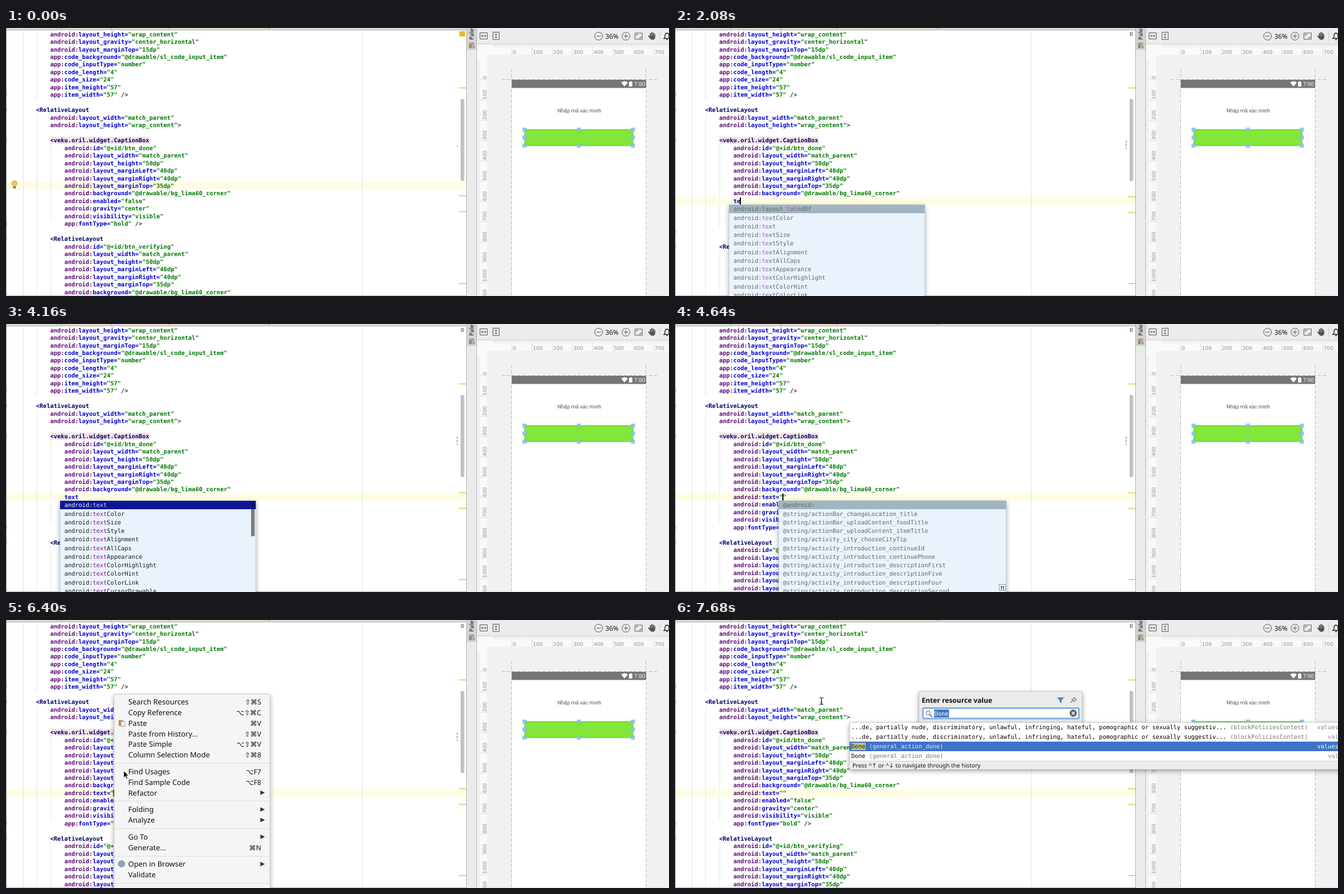
Write an HTML page that moves like this. It is 1177 px wide and 476 px high and loops after 8000 ms.

```html
<!DOCTYPE html>
<html lang="en">
<head>
<meta charset="utf-8">
<title>Layout editor</title>
<style>
html, body { margin: 0; width: 100%; height: 100%; overflow: hidden; background: #fff; }
svg { display: block; }
text { white-space: pre; text-rendering: geometricPrecision; }
.mono { font: 10.45px "DejaVu Sans Mono", monospace; }
.ui { font: 13px "Noto Sans", "DejaVu Sans", sans-serif; fill: #111; }
.key { font-size: 12.2px; }
.b { font-weight: bold; }
.ns { fill: #5c0a70; font-weight: bold; }
.at { fill: #0000d0; font-weight: bold; }
.val { fill: #007c00; font-weight: bold; }
.tag { fill: #000062; font-weight: bold; }
.num { font: 9px "DejaVu Sans", sans-serif; fill: #8d8d8d; }
.row.on text { fill: #fff; }
.float { filter: drop-shadow(0 3px 4px rgba(0, 0, 0, .35)); }
</style>
</head>
<body>
<svg id="stage" width="1177" height="476" viewBox="0 0 1177 476"></svg>
<script>
const LOOP = 8000, TICK = 160, LINE = 13.47, CH = 6.291;
const colX = c => 53.3 + (c - 8) * CH;
const baseY = row => 14.6 + row * LINE;

const esc = s => s.replace(/&/g, '&amp;').replace(/</g, '&lt;');
const rect = (x, y, w, h, fill, more = '') =>
  `<rect x="${x}" y="${y}" width="${w}" height="${h}" fill="${fill}" ${more}/>`;
const path = (d, stroke, more = '') => `<path d="${d}" stroke="${stroke}" fill="none" ${more}/>`;
const text = (x, y, cls, body, more = '') =>
  `<text x="${x}" y="${y}" class="${cls}" ${more}>${body}</text>`;
const span = (cls, s) => `<tspan class="${cls}">${esc(s)}</tspan>`;
const group = (id, body, more = '') => `<g id="${id}" ${more}>${body}</g>`;

// ---- code ----
function paint(s) {
  const m = s.match(/^(\w+:)(\w+=)("[^"]*")(.*)$/);
  if (m) return span('ns', m[1]) + span('at', m[2]) + span('val', m[3]) + esc(m[4]);
  return span(s[0] === '<' ? 'tag' : 'at', s);
}
const codeLine = (row, col, s) => text(colX(col), baseY(row), 'mono', paint(s));
const codeBlock = (row, src) => src.split('\n').map((s, i) => {
  const body = s.trimStart();
  return body && codeLine(row + i, 8 + s.length - body.length, body);
}).join('');

const ABOVE = `    android:layout_height="wrap_content"
    android:layout_gravity="center_horizontal"
    android:layout_marginTop="15dp"
    app:code_background="@drawable/sl_code_input_item"
    app:code_inputType="number"
    app:code_length="4"
    app:code_size="24"
    app:item_height="57"
    app:item_width="57" />

<RelativeLayout
    android:layout_width="match_parent"
    android:layout_height="wrap_content">

    <veku.oril.widget.CaptionBox
        android:id="@+id/btn_done"
        android:layout_width="match_parent"
        android:layout_height="50dp"
        android:layout_marginLeft="40dp"
        android:layout_marginRight="40dp"
        android:layout_marginTop="35dp"
        android:background="@drawable/bg_lima60_corner"`;
const BELOW = `        android:enabled="false"
        android:gravity="center"
        android:visibility="visible"
        app:fontType="bold" />

    <RelativeLayout
        android:id="@+id/btn_verifying"
        android:layout_width="match_parent"
        android:layout_height="50dp"
        android:layout_marginLeft="40dp"
        android:layout_marginRight="40dp"
        android:layout_marginTop="35dp"
        android:background="@drawable/bg_lima60_corner"`;

const fold = y => rect(0, y - 3, 2, 6, '#c4c4c4');
function editor() {
  const guide = '#e4e4e4', mark = y => rect(804, y - 1, 13, 2, '#e2d673');
  return rect(0, 0, 817, 476, '#fff') +
    rect(0, 0, 817, 13, '#fffce4', 'id="band"') +
    path('M30.5 4V476M54.5 4V126M54.5 152V476M79.5 206V300M632.5 4V476', guide) +
    rect(79, 193, 176, 13, '#f5e5ea') +
    codeBlock(0, ABOVE) + fold(118) + fold(145) + fold(199) +
    group('below', path('M79.5 300V341M79.5 381V476', guide) + codeBlock(22, BELOW) + fold(348) + fold(374)) +
    text(colX(16), baseY(22), 'mono', '', 'id="edit"') +
    rect(0, 0, 2, 12.5, '#000', 'id="caret"') +
    group('bulb', '<circle cx="15" cy="276" r="4.8" fill="#f2c55c" stroke="#cf9c3c"/>' +
      rect(12.5, 281, 5, 4, '#8a8378')) +
    rect(807, 126, 6.5, 146, '#c2c2c2', 'rx="3"') +
    mark(106.5) + mark(454) + group('marks', mark(298) + mark(326)) +
    group('idle', rect(805, 5.5, 10, 9.5, '#e6bb2c') + rect(800.5, 208, 1.5, 4, '#bbb')) +
    group('busy', path('M808.5 7V14M811.5 7V14', '#777', 'stroke-width="1.6"') +
      path('M801 200V215', '#b4b4b4', 'id="diff" stroke-width="2" stroke-dasharray="4 2"')) +
    rect(0, 0, 817, 3, '#dcdcdc') + rect(0, 0, 98, 3, '#cfe2da') + rect(100, 0, 367, 3, '#e8dad3') +
    path('M0 3.5H817', '#a9a9a9') + path('M99 0V3M187 0V3M288 0V3M467 0V3', '#999') +
    path('M.5 0V476', '#8a8a8a') + path('M0 475.5H817', '#9ccb9c');
}

// ---- design pane ----
function rulers() {
  let across = '', down = '', labels = '';
  for (let i = -9; i < 78; i++) across += `M${(898 + i * 3.6).toFixed(1)} 29v${i % 10 ? 5 : 19}`;
  for (let i = -9; i < 107; i++) down += `M837 ${(92 + i * 3.6).toFixed(1)}h${i % 10 ? 4 : 17}`;
  for (let i = 0; i < 8; i++) labels += text(899.5 + i * 36, 46, 'num', i * 100);
  for (let i = 0; i < 12; i++)
    labels += text(0, 0, 'num', i * 100, `transform="translate(852.5 ${91 + i * 36}) rotate(-90)"`);
  return rect(836, 28, 341, 20, '#f9f9f9') + rect(836, 28, 18, 448, '#f9f9f9') +
    path(across + down, '#d3d3d3', 'stroke-width=".8"') + labels;
}

function toolbar() {
  const ink = '#555';
  return rect(836, 0, 341, 28, '#ececec') + path('M836 28.5H1177', '#cfcfcf') +
    path('M841.5 8.5h13v11h-13zM844 14h8M846 12l-2 2 2 2M850 12l2 2-2 2', ink) +
    path('M864.5 7.5h11v13h-11zM870 10v8M868 12l2-2 2 2M868 16l2 2 2-2', ink) +
    path('M1059 14.5a7 7 0 1 1-14 0a7 7 0 1 1 14 0M1048 14.5h8M1107.5 14.5a7 7 0 1 1-14 0a7 7 0 1 1 14 0M1096.5 14.5h8M1100.5 10.5v8', ink) +
    text(1064, 19, 'ui', '36%', 'style="font-size:11.8px"') +
    path('M1116.5 9h13v11h-13zM1119 14v-2.5h3M1127 15v2.5h-3', ink) +
    path('M1143 17l-2-3M1144 15V10M1146.5 14V8M1149 14V9M1151.5 15V11', ink, 'stroke-width="2" stroke-linecap="round"') +
    '<path d="M1143 14h9.5v3q-1 4-5 4q-3 0-5-4z" fill="#555"/>' +
    path('M1160.5 5V24', '#ccc') +
    path('M1168 18.5q2-1.5 2-5q0-4 3.5-4.5q3.5 .5 3.5 4.5v5zM1172 20.5h3', '#222', 'stroke-width="1.4"');
}

function design() {
  let handles = '';
  for (const x of [920.5, 1017, 1113])
    for (const y of [180.5, 194.5, 209])
      if (x !== 1017 || y !== 194.5)
        handles += rect(x - 3, y - 3, 6, 6, '#8ac6e6', 'fill-opacity=".85" stroke="#6fb9de" stroke-width=".8"');
  return rect(836, 0, 341, 476, '#f1f1f1') + rulers() + toolbar() +
    rect(898, 92, 238.5, 384, '#fff') + rect(898, 92, 238.5, 14.5, '#757575') +
    path('M897.5 73V476M1136.5 73V476M880 91.5H1156', '#b9b9b9', 'stroke-dasharray="6 3"') +
    '<path d="M1092 97q6-5 12 0l-6 7z" fill="#fff"/>' +
    rect(1106, 96, 6, 8, '#fff') + rect(1107.5, 94.5, 3, 2, '#fff') +
    text(1115, 103, '', '7:00', 'fill="#fff" style="font:10px Roboto,sans-serif"') +
    text(1017.8, 149.5, '', 'Nhập mã xác minh', 'fill="#555" text-anchor="middle" style="font:9.3px Roboto,sans-serif"') +
    rect(921, 180.5, 192, 28.5, '#83e63a', 'stroke="#52b58c"') + handles +
    rect(817, 0, 19, 476, '#ebebeb') + rect(818, 0, 17, 39, '#d3d3d3') +
    path('M817.5 0V476M835.5 0V476', '#b3b3b3') +
    text(0, 0, 'ui', 'Palette', 'transform="translate(830 21) rotate(-90)" style="font-size:10px"') +
    rect(822, 26, 9, 4, '#d58a80') + rect(822, 30, 5, 6, '#62a86c') + rect(828, 31, 4, 5, '#7fa9c4') +
    path('M836 475.5H1177', '#dbe7db');
}

// ---- completion popups; matched letters sit between bars ----
function popup(id, x, w, items, live) {
  const rows = items.map((s, i) => {
    const chosen = live && !i;
    const body = s.split('|').map((p, k) => k % 2
      ? `<tspan fill="${chosen ? '#e3c9ff' : live ? '#8b1a98' : '#b458b4'}">${p}</tspan>` : p).join('');
    return text(x + 7.7, 325.3 + i * 15.27, 'mono', body, `fill="${chosen ? '#fff' : live ? '#1a1a1a' : '#666'}"`);
  }).join('');
  return group(id, rect(x, 314, w, 170, '#eaf3fb', 'stroke="#b3bfc9" stroke-width=".6" class="float"') +
    rect(x, 314, w, 15, live ? '#0b1796' : '#9fb5c1') + rows +
    (live ? rect(x + 339, 329, 6.5, 48, '#7d7d7d', 'rx="2"') + rect(x + 340, 317, 5, 9, '#12123c') : ''));
}
const attrs = (q, names) => names.map(n => 'android:' + n.replace(q, `|${q}|`));
const REST = 'textSize textStyle textAlignment textAllCaps textAppearance textColorHighlight textColorHint textColorLink'.split(' ');
const STRINGS = ['@android:', ...('actionBar_changeLocation_title actionBar_uploadContent_foodTitle actionBar_uploadContent_itemTitle ' +
  'activity_city_chooseCityTip activity_introduction_continueId activity_introduction_continuePhone ' +
  'activity_introduction_descriptionFirst activity_introduction_descriptionFive activity_introduction_descriptionFour ' +
  'activity_introduction_descriptionSecond').split(' ').map(s => '@string/' + s)];
const popups = () =>
  popup('first', 96, 347.5, ['android:layout_|t|o|E|ndOf', ...attrs('te', ['textColor', 'text', ...REST])], false) +
  popup('second', 96, 347.5, attrs('text', ['text', 'textColor', ...REST, 'textCursorDrawable']), true) +
  group('third', popup('strings', 184, 404, STRINGS, false) +
    rect(575.5, 462.5, 11, 11, '#f4f8fc', 'stroke="#8a98a4"') +
    text(577.5, 471.5, 'ui', 'π', 'style="font-size:11px"'));

// ---- context menu: [label, y, shortcut], '>' opens a submenu ----
const MENU = [
  ['Search Resources', 146, '⇧⌘S'], ['Copy Reference', 164.7, '⌥⇧⌘C'], ['Paste', 183.5, '⌘V'],
  ['Paste from History...', 202.3, '⇧⌘V'], ['Paste Simple', 221, '⌥⇧⌘V'], ['Column Selection Mode', 239.8, '⇧⌘8'],
  ['Find Usages', 269.8, '⌥F7'], ['Find Sample Code', 288.5, '⌥F8'], ['Refactor', 307.3, '>'],
  ['Folding', 337, '>'], ['Analyze', 355.8, '>'], ['Go To', 385.5, '>'], ['Generate...', 404.3, '⌘N'],
  ['Open in Browser', 434, '>'], ['Validate', 452.8, '']];
function menu() {
  const rows = MENU.map(([label, y, key]) => `<g class="row">` + text(217, y + 4.2, 'ui', label) +
    (key === '>' ? `<path d="M451.5 ${y - 4.5}l8 4l-8 4z" fill="#333"/>`
      : text(453, y + 4.2, 'ui key', key, 'text-anchor="end"')) + '</g>').join('');
  return group('menu', rect(192, 132, 276.5, 360, '#f5f5f5', 'stroke="#c2c2c2" stroke-width=".7" class="float"') +
    path([254.5, 321.5, 370.5, 419.5, 467.5].map(y => `M193 ${y}H468`).join(''), '#dcdcdc') +
    rect(192.5, 0, 275.5, 18.8, '#3b7ded', 'id="hover"') + rows +
    rect(200, 178, 8, 10, '#b98d52') + rect(204, 180, 7, 9, '#f3f3f3', 'stroke="#888" stroke-width=".8"') +
    '<circle cx="205" cy="433" r="5.8" fill="#86a9b4" stroke="#6c8796" stroke-width=".8"/>');
}

// ---- resource search ----
function dialog() {
  return group('dialog', rect(433, 127, 290, 60, '#ebebeb', 'stroke="#b5b5b5" stroke-width=".7" class="float"') +
    text(438, 146.5, 'ui b', 'Enter resource value', 'style="font-size:12.2px"') +
    '<path d="M678 137.5h13l-5 5.5v5l-3-2v-3z" fill="#4d86ad"/>' +
    path('M702 147l4-4M704 140l6 6M706 141l3-3M709 144l3-3M708 137l5 5', '#8a8a8a', 'stroke-width="1.5"') +
    rect(440, 156.5, 277, 18.5, '#fff', 'rx="2" stroke="#86afe0" stroke-width="3"') +
    '<circle cx="449.5" cy="165" r="3.6" fill="none" stroke="#555"/>' + path('M452 168l4 4', '#555', 'stroke-width="1.4"') +
    rect(460, 159, 26.5, 14, '#3f78c4') + text(460.5, 170, 'mono', 'Done', 'fill="#fff"') +
    '<circle cx="707" cy="165.5" r="6.5" fill="#666"/>' + path('M704.5 163l5 5M709.5 163l-5 5', '#fff', 'stroke-width="1.5"'));
}
function results() {
  const long = '...de, partially nude, discriminatory, unlawful, infringing, hateful, pomographic or sexually suggestiv...';
  const row = (i, s, key, where, x, on) => {
    const y = 193.7 + i * 17.1;
    return text(313, y, 'mono', `${s} <tspan fill="${on ? '#e4ecfa' : '#777'}">(${key})</tspan>`, `fill="${on ? '#222' : '#000'}"`) +
      text(x, y, 'mono', where, `fill="${on ? '#fff' : '#888'}"`);
  };
  return group('results', rect(310, 182, 880, 83, '#fff', 'stroke="#b5b5b5" stroke-width=".7" class="float"') +
    rect(310, 216, 867, 17, '#3f73c7') + rect(313, 218, 25.5, 13, '#c3bd86') +
    row(0, long, 'blockPoliciesContent', 'values', 1140) + row(1, long, 'blockPoliciesContent', 'val', 1159) +
    row(2, 'Done', 'general_action_done', 'values', 1140, true) + row(3, 'Done', 'general_action_done', 'val', 1159) +
    rect(310, 250, 867, 15, '#ededed') + path('M310 250.5H1177', '#d2d2d2') +
    text(315, 261.5, 'ui', 'Press ^↑ or ^↓ to navigate through the history', 'style="font-size:10.3px"'));
}

const mouse = () => group('ibeam',
  path('M-3.5-6q3.5 0 3.5 2v8q0 2-3.5 2M3.5-6q-3.5 0-3.5 2v8q0 2 3.5 2M-1.5 1.5h3', '#111', 'stroke-width="1.2"')) +
  group('arrow', '<path d="M0 0V12l2.8-2.6l2 4.6l2-.9l-2-4.5h3.7z" fill="#000" stroke="#fff" stroke-width=".7"/>');

const $ = id => document.getElementById(id);
$('stage').innerHTML = editor() + design() + popups() + menu() + dialog() + results() + mouse();
const rows = document.querySelectorAll('.row');

// ---- timeline ----
const EDIT = [[0, ''], [2080, 'te'], [2240, 'tex'], [2400, 'text'], [4480, 'android:text=""']];
const CARET = [[0, 0, -1], [1280, 21, 47], [1600, 22, 0], [2080, 22, 2], [2240, 22, 3], [2400, 22, 4],
  [3200, 22, -1], [3680, 22, 4], [4160, 22, -1], [4480, 22, 14], [5120, 22, -1], [5760, 22, 14], [7040, 22, -1]];
const HOVER = [[0, -1], [6560, 5], [6720, 2], [6880, 0]];
const SHOW = { bulb: [0, 1280], idle: [0, 1600], busy: [1600, LOOP], first: [2080, 2240], second: [2240, 4480],
  third: [4640, 5760], menu: [6080, 7040], dialog: [7200, LOOP], results: [7520, LOOP] };
const MOVES = {
  ibeam: [[[480, 720, 262], [960, 405, 295], [1600]], [[5120, 262, 330], [5440, 201, 310], [6080]], [[7040, 260, 144], [LOOP]]],
  arrow: [[[6080, 200, 306], [6400, 209, 268], [6880, 258, 146], [7040]]]
};

const at = (table, t) => table.filter(e => e[0] <= t).pop();
const show = (id, on) => $(id).style.display = on ? '' : 'none';

function place(id, t) {
  const run = MOVES[id].find(r => t >= r[0][0] && t < r[r.length - 1][0]);
  show(id, run);
  if (!run) return;
  const i = run.findLastIndex(p => p[0] <= t), a = run[i], b = run[i + 1];
  const k = b.length > 1 ? (t - a[0]) / (b[0] - a[0]) : 0;
  const mix = j => k ? a[j] + (b[j] - a[j]) * k : a[j];
  $(id).setAttribute('transform', `translate(${mix(1)} ${mix(2)})`);
}

function render(t) {
  const [, row, col] = at(CARET, t), entered = t >= 1600, hot = at(HOVER, t)[1];
  for (const id in SHOW) show(id, t >= SHOW[id][0] && t < SHOW[id][1]);
  for (const id in MOVES) place(id, t);

  $('band').setAttribute('y', Math.round(4.4 + (t < 1280 ? 20 : row) * LINE));
  $('below').setAttribute('transform', `translate(0 ${entered ? LINE : 0})`);
  $('marks').setAttribute('transform', `translate(0 ${entered ? 1.5 : 0})`);
  $('diff').setAttribute('stroke', t >= 4480 ? '#8fc3c0' : '#b4b4b4');

  const typed = at(EDIT, t)[1];
  $('edit').innerHTML = typed && paint(typed);
  show('caret', col >= 0);
  $('caret').setAttribute('x', colX(16 + col) - 1.2);
  $('caret').setAttribute('y', 4.8 + row * LINE);

  show('hover', hot >= 0);
  if (hot >= 0) $('hover').setAttribute('y', MENU[hot][1] - 9.4);
  rows.forEach((r, i) => r.classList.toggle('on', i === hot));
}

const start = performance.now();
let last = -1;
function loop() {
  const t = Math.floor((performance.now() - start) % LOOP / TICK) * TICK;
  if (t !== last) render(last = t);
  requestAnimationFrame(loop);
}
loop();
</script>
</body>
</html>
```
